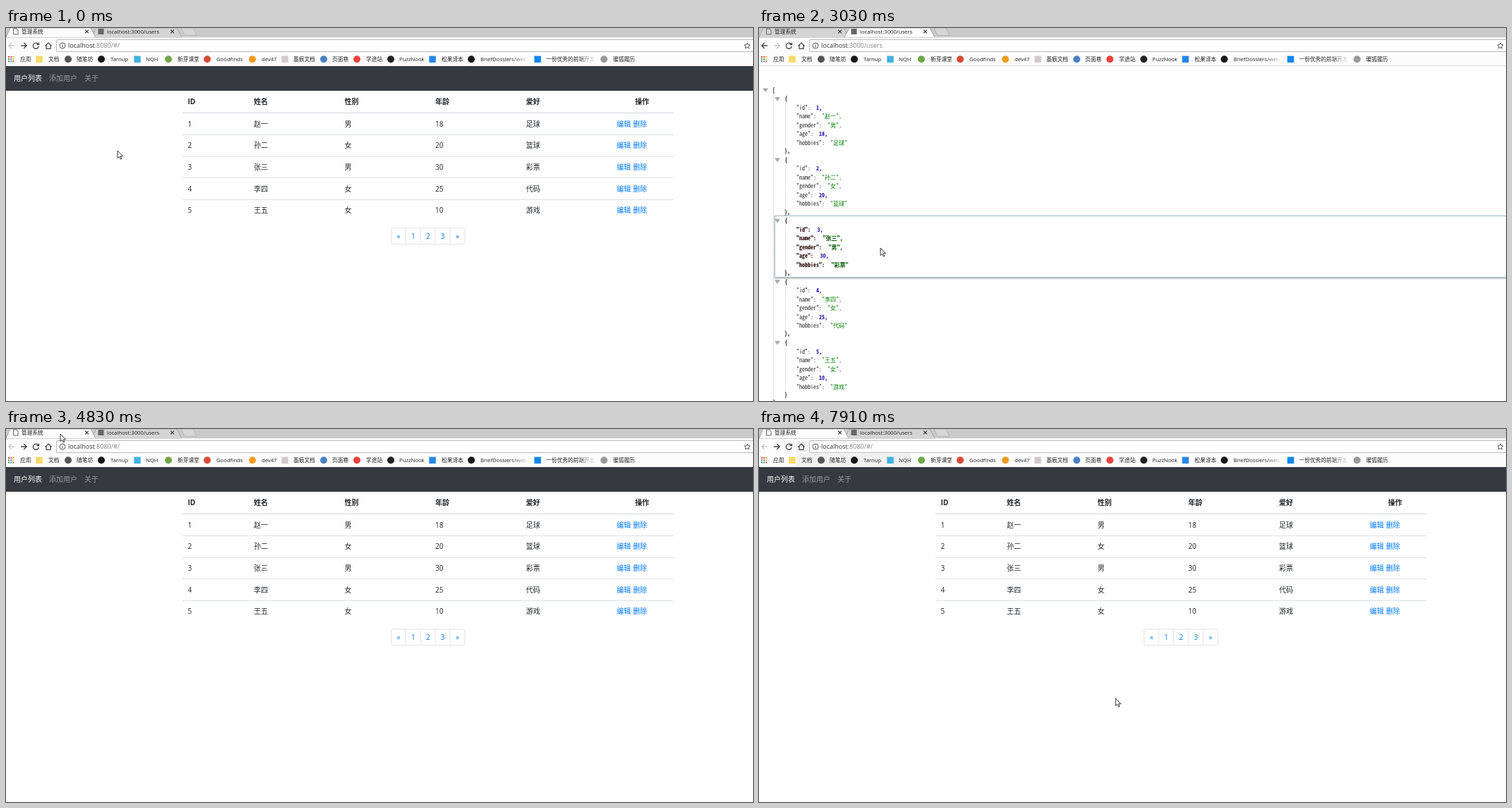
Animation of 1058x529 px, one loop 8 s. Source, as an HTML page:

```html
<!DOCTYPE html>
<html lang="zh-CN">
<head>
<meta charset="utf-8">
<title>管理系统</title>
<style>
  html, body { margin: 0; width: 100%; height: 100%; overflow: hidden; background: #fff; }
  svg { display: block; width: 1058px; height: 529px; }
  text { font-family: "Open Sans", "Noto Sans CJK SC", "Noto Sans CJK", sans-serif; font-size: 10px; fill: #212529; }
  .small { font-size: 7.7px; fill: #222; }
  .url { font-size: 9px; fill: #333; }
  .url .dim { fill: #808080; }
  .url.selected, .url.selected .dim { fill: #fff; }
  .bold { font-weight: 700; }
  .link { fill: #007bff; }
  .mid { text-anchor: middle; }
  .nav { fill: #999da0; }
  .nav.on { fill: #fff; }
  .json text { font-family: "Noto Sans Mono CJK SC", "Noto Sans CJK SC", monospace; font-size: 8px; fill: #222; }
  .json .str { fill: #008000; }
  .json .num { fill: #2200aa; font-weight: 700; }
  .json .picked text { font-weight: 700; fill: #200; }
  .json .picked .str { fill: #050; transform: translateX(1.5px); }
  .json .picked .num { fill: #2200aa; transform: translateX(1.5px); }
  .box { fill: none; stroke: none; }
  .hover > .box { stroke: #d3dde2; }
  .picked > .box { fill: #fefefe; stroke: #a3bfd3; filter: drop-shadow(0 1px 1px #999); }
</style>
</head>
<body>
<svg id="stage" viewBox="0 0 1058 529"></svg>
<script>
const LOOP = 8000;
const OPEN_JSON = 1310, PICK = 2880, OPEN_APP = 4700;
const people = [
  ['赵一', '男', 18, '足球'], ['孙二', '女', 20, '篮球'], ['张三', '男', 30, '彩票'],
  ['李四', '女', 25, '代码'], ['王五', '女', 10, '游戏']
];
// label, text x, icon x, icon shape, colour
const bookmarks = [
  ['文档', 60, 47, 's', '#f5d96b'], ['随笔坊', 100, 88, 'c', '#555'],
  ['Tarnup', 148, 135, 'c', '#181818'], ['NQH', 198, 186, 's', '#42b1e2'],
  ['新芽课堂', 243, 230, 'c', '#70a74a'], ['Goodfinds', 298, 285, 'c', '#d74a35'],
  ['dev47', 362, 349, 'c', '#f39a1f'], ['墨痕文档', 407, 395, 's', '#d3c9c9'],
  ['页面巷', 462, 450, 'c', '#4b80c5'], ['学途站', 510, 497, 'c', '#e8423c'],
  ['PuzzNook', 557, 545, 'c', '#222'], ['松果译本', 617, 604, 's', '#2387e8'],
  ['BriefDossiers/web', 672, 659, 'c', '#181818'], ['一份优秀的前端开发', 765, 753, 's', '#0f88eb'],
  ['暖狐履历', 860, 847, 'c', '#999']
];

const text = (x, y, s, cls = '') => `<text x="${x}" y="${y}" class="${cls}">${s}</text>`;
const rect = (x, y, w, h, fill, more = '') =>
  `<rect x="${x}" y="${y}" width="${w}" height="${h}" fill="${fill}" ${more}/>`;
const line = (d, color, width = 1, more = '') =>
  `<path d="${d}" fill="none" stroke="${color}" stroke-width="${width}" ${more}/>`;
const group = (id, body, cls = '') => `<g id="${id}" class="${cls}">${body}</g>`;
const closeMark = x => line(`M${x - 2.3} 2.7l4.6 4.6m0-4.6l-4.6 4.6`, '#333', 1.2);

const TAB1 = 'M0 13.5L6 0H120L127 13.5Z', TAB2 = 'M121 13.5L128 0H242L249 13.5Z';

function tabs() {
  return rect(0, 0, 1058, 13.5, '#cacaca') +
    `<path id="tab2" d="${TAB2}" stroke="#999" stroke-width=".7"/>` +
    `<path id="tab1" d="${TAB1}" stroke="#999" stroke-width=".7"/>` +
    '<path id="tabFront" stroke="#999" stroke-width=".7" fill="#fcfcfc"/>' +
    '<path d="M248 0L253 10.5H270L265 0Z" fill="#d6d6d6" stroke="#aaa" stroke-width=".7"/>' +
    line('M10.5 1H15l2 2.2V9H10.5Z', '#555', .9) + text(22, 7.8, '管理系统', 'small') + closeMark(114.5) +
    rect(130.5, 1, 8, 8, '#666') + text(143, 7.8, 'localhost:3000/users', 'small') + closeMark(235.5);
}

function toolbar() {
  return rect(0, 13.5, 1058, 40, '#fcfcfc') +
    rect(71.5, 16.5, 1000, 17, '#fff', 'rx="1.5" stroke="#bbb"') +
    '<g id="marks"></g>' +
    line('M12 25H3.8M7.8 21L3.8 25L7.8 29', 'currentColor', 1.3, 'id="back"') +
    line('M21 25H29.2M25.2 21L29.2 25L25.2 29', 'currentColor', 1.3, 'id="next"') +
    line('M45.7 23A4 4 0 1 0 46.3 26M46.5 20.7V23.7H43.4', '#444', 1.3) +
    line('M55.5 25.5L60 21L64.5 25.5M57 24.5V29.3H63V24.5', '#444', 1.2) +
    '<circle cx="80" cy="25" r="4" fill="none" stroke="#555"/>' +
    line('M80 24.3V27.3M80 22.5V23.5', '#555', 1.1) +
    rect(88, 18, 87, 13, '#0078d7', 'id="selection"') +
    '<text id="url" x="88" y="28.2" class="url">localhost<tspan class="dim"></tspan></text>' +
    line('M1049.8 21l1.2 2.7 2.9.3-2.2 2 .7 2.9-2.6-1.5-2.6 1.5.7-2.9-2.2-2 2.9-.3z', '#444', .9);
}

function bookmarkBar() {
  const dots = ['#e54b3c', '#e54b3c', '#f0b323', '#4a9b50', '#3f7fe0', '#f0b323', '#4a9b50', '#3f7fe0', '#e54b3c'];
  const apps = dots.map((c, i) => rect(3 + i % 3 * 3.2, 40 + Math.floor(i / 3) * 3.2, 2, 2, c)).join('');
  const items = bookmarks.map(([label, x, cx, shape, color]) =>
    (shape === 'c' ? `<circle cx="${cx}" cy="44.3" r="5" fill="${color}"/>` : rect(cx - 4.7, 39.6, 9.4, 9.4, color)) +
    text(x, 47.3, label, 'small')).join('');
  const fade = '<linearGradient id="fade"><stop stop-color="#fcfcfc" stop-opacity="0"/><stop offset="1" stop-color="#fcfcfc"/></linearGradient>';
  return apps + text(20, 47.3, '应用', 'small') + items + fade +
    rect(716, 38, 25, 13, 'url(#fade)') + rect(810, 38, 25, 13, 'url(#fade)');
}

function appPage() {
  const cols = [257.5, 351, 479.5, 608, 736.5];
  let out = rect(0, 53.5, 1058, 475.5, '#fefefe') + rect(0, 54, 1058, 35, '#343a40') +
    text(11, 75.2, '用户列表', 'nav on') + text(61, 75.2, '添加用户', 'nav') + text(111, 75.2, '关于', 'nav');
  ['ID', '姓名', '性别', '年龄', '爱好'].forEach((s, i) => out += text(cols[i], 108.3, s, 'bold'));
  out += text(891, 108.3, '操作', 'bold') + line('M250 120.4H945', '#d9dde1', 1.2);
  people.forEach((p, i) => {
    const y = 139.6 + 30.7 * i;
    [i + 1, ...p].forEach((s, k) => out += text(cols[k], y, s));
    out += text(865, y, '编辑', 'link') + text(888, y, '删除', 'link');
    if (i < 4) out += line(`M250 ${Math.round(y + 11.4) + .5}H945`, '#dee2e6');
  });
  out += rect(545.5, 283.8, 104.5, 23, '#fff', 'rx="2.5" stroke="#dee2e6"');
  ['«', 1, 2, 3, '»'].forEach((s, i) => {
    if (i) out += line(`M${545 + 21 * i} 284V307`, '#dee2e6');
    out += text(556 + 20.9 * i, 299.4, s, 'link mid');
  });
  return out;
}

const itemTop = i => 180 + 86.45 * (i - 1);
const triangle = (x, y) => `<path d="M${x - 4} ${y - 2.8}h8l-4 5.8z" fill="#aaa"/>`;

function jsonItem(p, i) {
  const top = itemTop(i);
  const fields = { id: i + 1, name: p[0], gender: p[1], age: p[2], hobbies: p[3] };
  let out = `<rect class="box" x="22.5" y="${Math.floor(top) + .5}" width="1060" height="87"/>` +
    triangle(26, top + 7.2) + text(36.5, top + 9.6, '{', 'bold') +
    line(`M37.5 ${top + 13}V${top + 77}`, '#ccc', 1, 'stroke-dasharray="1 1"');
  Object.entries(fields).forEach(([key, value], k) => {
    const y = top + 22.4 + 12.45 * k;
    const num = typeof value === 'number', comma = k < 4 ? ',' : '';
    out += text(53, y, `"${key}":`) +
      text(61 + 4 * (key.length + 3), y, (num ? value : `"${value}"`) + comma, num ? 'num' : 'str');
  });
  return group('item' + i, out + text(36, top + 83.5, i < 4 ? '},' : '}', 'bold'));
}

function jsonPage() {
  return rect(0, 53.5, 1058, 475.5, '#fefefe') + line('M0 53.5H1058', '#ddd') +
    group('root', '<rect class="box" x="5.5" y="81.5" width="1080" height="470"/>' + triangle(9, 88.3) +
      text(19, 91, '[', 'bold') + line('M20.5 94V527', '#ccc', 1, 'stroke-dasharray="1 1"') +
      text(19, 534, ']', 'bold')) +
    people.map(jsonItem).join('');
}

const stage = document.getElementById('stage');
stage.innerHTML = tabs() + toolbar() + bookmarkBar() + group('app', appPage()) + group('json', jsonPage(), 'json') +
  group('pointer',
    '<path id="arrow" d="M0 0V10.6L2.5 8.4L4.3 12.2L5.9 11.4L4.2 7.8H7.5Z" fill="#fff" stroke="#222" stroke-width=".9"/>' +
    line('M-2 -5H-.6L0 -4.4L.6 -5H2M0 -4.4V4.4M-2 5H-.6L0 4.4L.6 5H2', '#222', 1, 'id="beam"'));
const el = id => document.getElementById(id);
const show = (id, on) => el(id).setAttribute('visibility', on ? 'visible' : 'hidden');

// Bursts of picture changes: start, end, count. Each change falls on a 10 ms tick.
const times = [0];
for (const [a, b, n] of [[150, 1170, 8], [1310, 1740, 4], [2020, 3030, 8], [3160, 4140, 8],
  [4290, 5250, 8], [5410, 6410, 8], [6560, 6710, 2], [6990, 7910, 8]])
  for (let i = 0; i < n; i++) times.push(Math.floor((a + (b - a) * i / (n - 1)) / 10) * 10);

const path = [
  [0, 158, 174], [150, 159, 168], [600, 168, 90], [1020, 174, 14], [1165, 174, 6], [1740, 170, 9],
  [2020, 132, 20], [2450, 71, 41], [2600, 80, 130], [2880, 160, 300], [3030, 172, 312], [3300, 178, 250],
  [3580, 180, 191], [3860, 184, 390], [4000, 170, 455], [4140, 150, 330], [4290, 132, 200],
  [4564, 88, 40], [4700, 78, 10], [4830, 77, 7], [5250, 62, 22], [5410, 60, 27], [5550, 74, 42],
  [5840, 150, 44], [5980, 180, 47], [6200, 140, 66], [6410, 92, 91], [6560, 96, 160], [6710, 106, 230],
  [6990, 300, 208], [7120, 374, 191], [7500, 470, 290], [7780, 507, 398], [7910, 505, 382]
];
// Hover tints: start, end, then x, y, width, height.
const tints = [
  [1020, 1310, 127, 35, 110, 18], [2300, 2600, 61, 35, 32, 18],
  [5250, LOOP, 53, 17, 17, 17], [5550, LOOP, 53, 35, 162, 18]
];

function at(t) {
  const k = path.findIndex(p => p[0] > t);
  if (k < 0) return path[path.length - 1].slice(1);
  const [a, b] = [path[k - 1], path[k]], f = (t - a[0]) / (b[0] - a[0]);
  return [a[1] + (b[1] - a[1]) * f, a[2] + (b[2] - a[2]) * f].map(Math.round);
}

function draw(t) {
  const [x, y] = at(t);
  const json = t >= OPEN_JSON && t < OPEN_APP, selected = json && t < PICK;
  show('app', !json);
  show('json', json);
  show('selection', selected);
  el('tab1').setAttribute('fill', y < 13 && x < 124 ? '#dfdfdf' : '#d4d4d4');
  el('tab2').setAttribute('fill', y < 13 && x > 126 && x < 246 ? '#dfdfdf' : '#d4d4d4');
  el('tabFront').setAttribute('d', json ? TAB2 : TAB1);
  el('back').style.color = json ? '#444' : '#c8c8c8';
  el('next').style.color = json ? '#c8c8c8' : '#444';
  el('url').setAttribute('class', selected ? 'url selected' : 'url');
  el('url').querySelector('tspan').textContent = json ? ':3000/users' : ':8080/#/';
  el('marks').innerHTML = tints.filter(m => t >= m[0] && t < m[1])
    .map(m => rect(...m.slice(2), '#f0f0f0')).join('');
  el('root').setAttribute('class', json && y >= 81 && y < 94 ? 'hover' : '');
  people.forEach((_, i) => {
    const inside = json && y >= itemTop(i) && y < itemTop(i + 1);
    el('item' + i).setAttribute('class', json && i === 2 && t >= PICK ? 'picked' : inside ? 'hover' : '');
  });
  const beam = !json && x > 250 && x < 945 && y > 90 && y < 275;
  show('arrow', !beam);
  show('beam', beam);
  el('pointer').setAttribute('transform', `translate(${x} ${y})`);
}

const start = performance.now();
let last = -1;
function tick() {
  const now = (performance.now() - start) % LOOP;
  const t = times.filter(s => s <= now).pop();
  if (t !== last) draw(last = t);
  requestAnimationFrame(tick);
}
tick();
</script>
</body>
</html>
```
